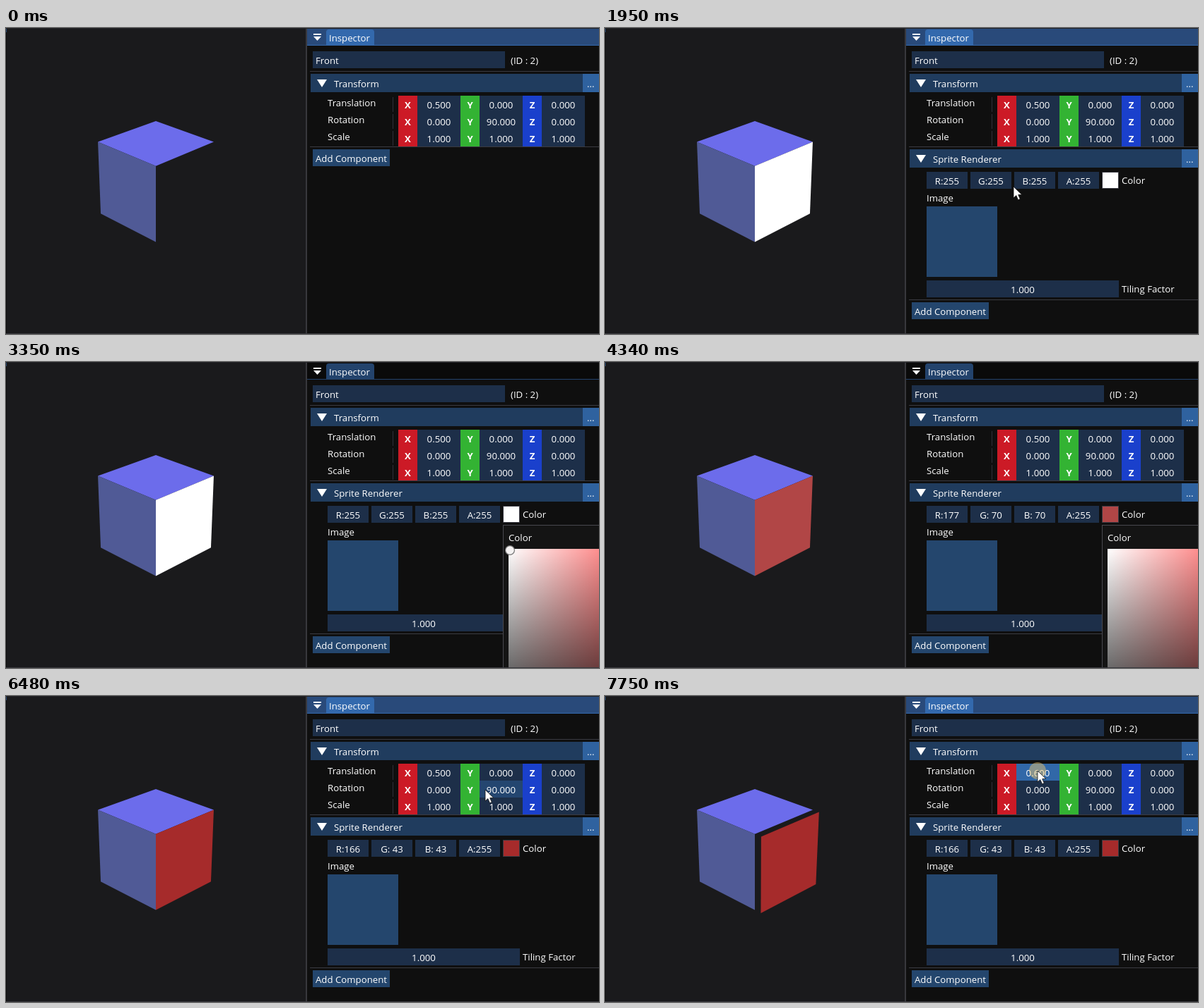
An HTML page with a canvas for the animation above (8000 ms loop, 839 by 434 pixels).

```html
<!DOCTYPE html>
<html lang="en">
<head>
<meta charset="utf-8">
<title>Inspector</title>
<style>
html, body { margin: 0; width: 100%; height: 100%; overflow: hidden; background: #1a1a1c; }
canvas { display: block; }
</style>
</head>
<body>
<canvas id="stage" width="839" height="434"></canvas>
<script>
const g = document.getElementById('stage').getContext('2d');
const LOOP = 8000;
const FONT = '13.22px "Open Sans", sans-serif';
const FIELD = '#1d2f49', BUTTON = '#24466d', HOVER = '#244670', ACTIVE = '#3168a8', SELECT = '#3a7ccd';

// Pointer path: time, x, y
const path = [
  [70, -20, 150], [620, 527, 185], [880, 527, 187], [1150, 557, 226], [1600, 570, 225],
  [1950, 578, 225], [2080, 578, 225], [2550, 713, 214], [3080, 720, 215], [3270, 781, 329],
  [3340, 860, 390], [4810, 860, 380], [5180, 682, 271], [5660, 682, 271], [5900, 690, 312],
  [6480, 678, 133], [6550, 678, 133], [6850, 611, 106], [6950, 611, 106], [7200, 633, 106],
  [7350, 631, 106], [7750, 612, 106]
];
const presses = [[640, 760], [1640, 1720], [2640, 2740], [5190, 5400], [6880, LOOP]];
const within = (t, a, b) => t >= a && t < b;
const smooth = u => u * u * (3 - 2 * u);

function pointerAt(t) {
  const i = path.findIndex(k => k[0] > t);
  if (i === 0) return [-50, 150];
  if (i < 0) return path[path.length - 1].slice(1);
  const [t0, x0, y0] = path[i - 1], [t1, x1, y1] = path[i];
  const u = smooth((t - t0) / (t1 - t0));
  return [x0 + (x1 - x0) * u, y0 + (y1 - y0) * u];
}

function rect(x, y, w, h, color) {
  g.fillStyle = color;
  g.fillRect(x, y, w, h);
}

function text(s, x, y, align = 'left', weight = '') {
  g.font = weight + ' ' + FONT;
  g.textAlign = align;
  g.fillStyle = '#fff';
  g.fillText(s, x, y);
}

function poly(points, color) {
  g.beginPath();
  points.forEach(p => g.lineTo(...p));
  g.closePath();
  g.fillStyle = color;
  g.fill();
}

function disc(x, y, r, color) {
  g.beginPath();
  g.arc(x, y, r, 0, 7);
  g.fillStyle = color;
  g.fill();
}

// World point to screen; the camera looks down at the cube's front edge
function project(x, y, z) {
  const sin = 0.435, cos = 0.9004, dist = 8.7, side = (x - z) * Math.SQRT1_2, near = (x + z) * Math.SQRT1_2;
  const k = 113 / (1 - (y * sin + near * cos) / dist);
  return [212 + k * side, 213.6 - k * (y * cos - near * sin)];
}

function drawCube(shift, frontColor) {
  const h = 0.5, face = corners => corners.map(c => project(...c));
  poly(face([[-h, h, -h], [h, h, -h], [h, h, h], [-h, h, h]]), '#6c6ceb');
  poly(face([[-h, h, h], [h, h, h], [h, -h, h], [-h, -h, h]]), '#505a96');
  if (frontColor)
    poly(face([[shift, h, h], [shift, h, -h], [shift, -h, -h], [shift, -h, h]]), frontColor);
}

function drawTitle(focused) {
  rect(426, 1, 413, 24, focused ? '#294a7a' : '#0a0a0a');
  const tab = focused ? '#3369ad' : '#23436c';
  rect(426, 24, 413, 1, tab);
  g.beginPath();
  g.roundRect(453, 2, 68, 23, [4, 4, 0, 0]);
  g.fillStyle = tab;
  g.fill();
  rect(435, 8, 11, 2, '#fff');
  poly([[435, 12], [446, 12], [440.5, 18]], '#fff');
  text('Inspector', 457, 19);
}

function drawHeader(label, y, over) {
  rect(431, y, 385, 26, over(431, y, 385, 26) ? SELECT : '#203c5e');
  rect(816, y, 23, 26, over(816, y, 23, 26) ? '#4296fa' : '#2f629f');
  poly([[440, y + 8], [454, y + 8], [447, y + 19]], '#fff');
  text(label, 464, y + 19);
  text('...', 822, y + 19);
}

function drawField(label, x, y, w, over, active) {
  rect(x, y, w, 24, active ? ACTIVE : over(x, y, w, 24) ? HOVER : FIELD);
  text(label, x + w / 2, y + 18, 'center');
}

function drawTransform(shift, over, dragging) {
  const rows = [['Translation', shift, 0, 0], ['Rotation', 0, 90, 0], ['Scale', 1, 1, 1]];
  const axes = [['X', '#cc1a26'], ['Y', '#33b333'], ['Z', '#1a40cc']];
  rows.forEach(([label, ...values], r) => {
    const y = 96 + r * 24;
    text(label, 455, y + 15);
    rect(547, y + 2, 1, 21, '#303038');
    axes.forEach(([axis, color], i) => {
      const x = 555 + i * 88;
      rect(x, y, 27, 24, color);
      text(axis, x + 13.5, y + 18, 'center', 'bold');
      drawField(values[i].toFixed(3), x + 27, y, 61, over, dragging && r + i === 0);
    });
  });
}

function drawSprite(rgb, color, over) {
  drawHeader('Sprite Renderer', 172, over);
  [...rgb, 255].forEach((v, i) =>
    drawField('RGBA'[i] + ':' + String(v).padStart(3), 455 + i * 62, 204, 58, over));
  rect(703, 204, 24, 24, '#3a3a42');
  rect(704, 205, 22, 22, color);
  text('Color', 731, 221);
  text('Image', 455, 246);
  rect(455, 253, 100, 100, BUTTON);
  drawField('1.000', 455, 358, 272, over);
  text('Tiling Factor', 731, 375);
  rect(430, 385, 409, 1, '#3b3b42');
}

function drawPopup(x, y, w, h) {
  rect(x, y, w, h, '#48484e');
  rect(x + 1, y + 1, w - 2, h - 2, '#141414');
}

function drawMenu(py) {
  drawPopup(527, 185, 146, 78);
  ['Camera', 'Sprite Renderer', 'PlayerController'].forEach((label, i) => {
    const y = 191 + i * 22;
    if (within(py, y, y + 22)) rect(531, y, 138, 22, SELECT);
    text(label, 535, y + 17);
  });
}

function drawPicker(showMarker) {
  const size = 290, x = 711, y = 265;
  drawPopup(703, 231, 320, 420);
  text('Color', 711, 254);
  const ramps = [[x + size, y, '#fff', '#f00'], [x, y + size, 'rgba(0,0,0,0)', '#000']];
  for (const [x1, y1, from, to] of ramps) {
    const ramp = g.createLinearGradient(x, y, x1, y1);
    ramp.addColorStop(0, from);
    ramp.addColorStop(1, to);
    rect(x, y, size, size, ramp);
  }
  if (showMarker) {
    disc(713, 267, 7, '#777');
    disc(713, 267, 5.8, '#f4f2f2');
  }
}

function drawPointer(x, y) {
  const shape = [[0, 0], [0, 16], [3.8, 12.6], [6.5, 18.8], [9.3, 17.6], [6.7, 11.6], [11.8, 11.4]];
  poly(shape.map(p => [x + p[0], y + p[1]]), '#fff');
  g.strokeStyle = '#111';
  g.lineWidth = 0.8;
  g.stroke();
}

function draw(t) {
  const [px, py] = pointerAt(t);
  const menu = within(t, 740, 1720), picker = within(t, 2740, 5190);
  const sprite = t >= 1730, dragging = t >= 6880;
  const over = (x, y, w, h) => !menu && !picker && !dragging && within(px, x, x + w) && within(py, y, y + h);
  const shift = dragging ? 0.5 + Math.round(px - 611) / 10 : 0.5;
  const mix = smooth(Math.min(1, Math.max(0, (t - 3650) / 890)));
  const rgb = [166, 43, 43].map(v => Math.round(255 + (v - 255) * mix));
  const color = `rgb(${rgb})`;

  rect(0, 0, 839, 434, '#1a1a1c');
  drawCube(shift, sprite && color);
  rect(0, 0, 1, 434, '#0c0c0d');
  rect(0, 0, 1, 6, '#23436c');
  rect(424, 0, 415, 434, '#0f0f0f');
  rect(424, 0, 2, 434, '#38383d');
  rect(0, 0, 839, 1, '#222226');
  drawTitle(!menu && !picker);

  rect(434, 33, 272, 24, over(434, 33, 272, 24) ? HOVER : FIELD);
  text('Front', 438, 51);
  text('(ID : 2)', 714, 51);
  rect(430, 61, 409, 1, '#3b3b42');
  drawHeader('Transform', 65, over);
  drawTransform(shift, over, dragging);
  rect(430, 168, 409, 1, '#3b3b42');
  if (sprite) drawSprite(rgb, color, over);

  const addY = sprite ? 389 : 172;
  rect(434, addY, 109, 24, over(434, addY, 109, 24) ? '#4296fa' : BUTTON);
  text('Add Component', 438, addY + 18);
  if (menu) drawMenu(py);
  if (picker) drawPicker(t < 3670);
  rect(0, 433, 839, 1, '#38383d');

  if (presses.some(([a, b]) => within(t, a, b)))
    disc(px, py, 12, dragging ? 'rgba(240,200,110,.47)' : 'rgba(250,240,0,.47)');
  drawPointer(px, py);
}

const start = performance.now();
function tick() {
  draw((performance.now() - start) % LOOP);
  requestAnimationFrame(tick);
}
tick();
</script>
</body>
</html>
```
